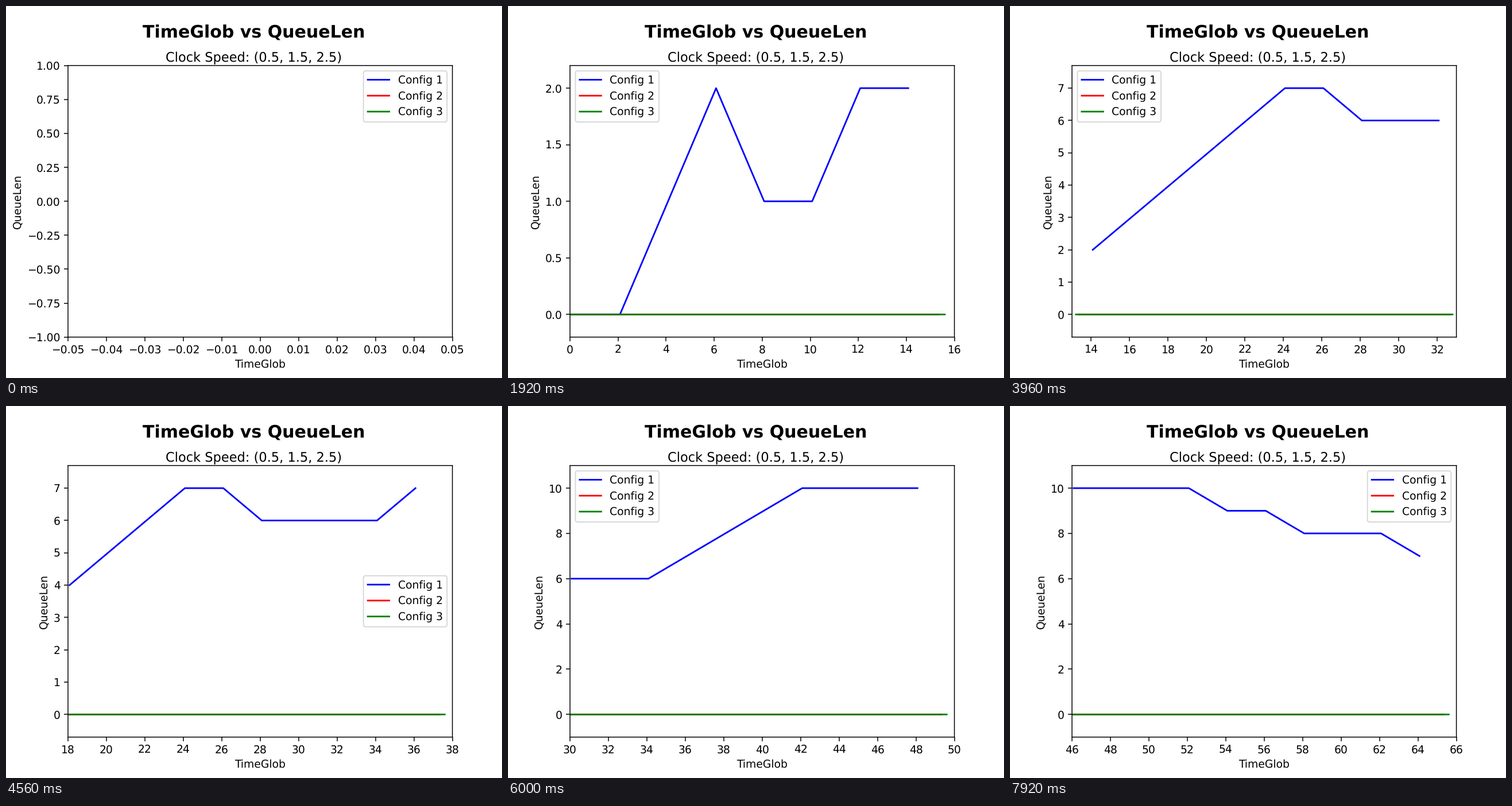
A matplotlib script that plays this animation: 864 px wide and 648 px high, repeating every 8000 ms.

```python
import numpy as np
import matplotlib.pyplot as plt
from matplotlib.animation import FuncAnimation

INTERVAL = 40       # ms per frame
HOLD = 3            # frames per simulated second
FRAMES = 200
END = FRAMES // HOLD
WINDOW = 20         # seconds of history kept on screen


def clock(speed, offset):
    return np.arange(int(END * speed) + 1) / speed + offset


def make_series():
    """The slow machine's queue grows and shrinks; the others keep up."""
    slow, mid, fast = clock(0.5, 0.08), clock(1.5, 0.002), clock(2.5, 0.002)
    change = np.zeros(len(slow))
    change[[2, 3, 6, *range(8, 13), *range(18, 22)]] = 1
    change[[4, 14, 27, 29, 32]] = -1
    return [(slow, change.cumsum()), (mid, 0 * mid), (fast, 0 * fast)]


plt.rcParams.update({
    "font.family": "DejaVu Sans",
    "path.snap": False,
    "text.hinting": "none",
})
fig, ax = plt.subplots(figsize=(6.4, 4.8), dpi=135)
fig.subplots_adjust(left=0.125, right=0.9, bottom=0.11, top=0.84)
fig.suptitle("TimeGlob vs QueueLen", fontsize=16, fontweight="bold", y=0.95)
fig.text(0.5, 0.85, "Clock Speed: (0.5, 1.5, 2.5)", fontsize=12, ha="center")
ax.set_xlabel("TimeGlob")
ax.set_ylabel("QueueLen")
ax.locator_params(axis="x", nbins=10)

series = make_series()
lines = [ax.plot([], [], color=color, label=f"Config {i}")[0]
         for i, color in enumerate(("blue", "red", "green"), 1)]
ax.legend(loc="best")


def update(frame):
    now = frame // HOLD
    start = max(0, now - WINDOW)
    top = 0
    for line, (t, q) in zip(lines, series):
        seen = (t >= start) & (t <= now)
        line.set_data(t[seen], q[seen])
        top = max(top, q[seen].max(initial=0))

    if now:
        ax.set_xlim(start, now)
    else:
        ax.set_xlim(-0.05, 0.05)
    margin = 0.1 * top if top else 1
    ax.set_ylim(-margin, top + margin)
    return lines


anim = FuncAnimation(fig, update, frames=FRAMES, init_func=lambda: update(0),
                     interval=INTERVAL, repeat=True, repeat_delay=0, blit=False)
plt.show()
```
